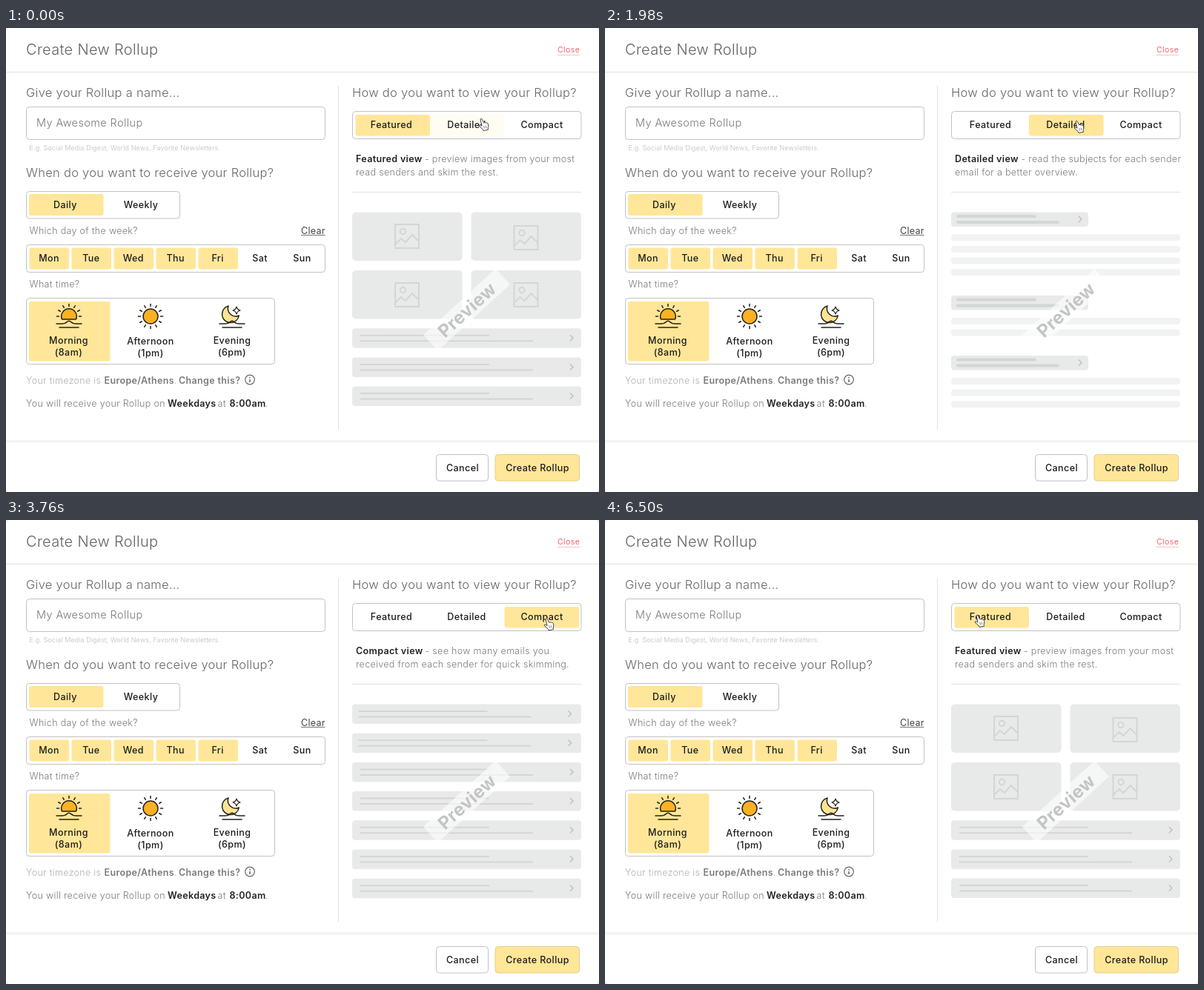
An HTML page that plays this animation: 800x626 px, repeating every 6.52 s.

```html
<!DOCTYPE html>
<html lang="en">
<head>
<meta charset="utf-8">
<title>Create New Rollup</title>
<style>
  html, body { margin: 0; width: 100%; height: 100%; overflow: hidden; background: #f1eded; }
  svg { display: block; width: 800px; height: 626px; }
  text { font: 300 12.5px Inter, "Open Sans", sans-serif; letter-spacing: .32px; fill: #7a7a7a; }
  .title { font-size: 20px; fill: #626262; }
  .head { font-size: 16.5px; letter-spacing: .27px; fill: #666; }
  .input { font-size: 14.5px; letter-spacing: .4px; }
  .hint { font-size: 9px; letter-spacing: .13px; fill: #bbb; }
  .label { font-weight: 500; letter-spacing: .42px; fill: #1c1c1c; text-anchor: middle; }
  .strong { font-weight: 600; fill: #222; letter-spacing: .35px; }
  .zone { fill: #b0b0b0; }
  .zone .strong { fill: #7a7a7a; }
  .clear { font-weight: 400; fill: #444; }
  .close { font-size: 10.5px; font-weight: 400; letter-spacing: .4px; fill: #f0646c; }
  .stamp { font-size: 24px; font-weight: 700; fill: #c3c5c5; text-anchor: middle; }
  .box { fill: #fff; stroke: #c2c2c2; }
  .pill { fill: #ffe699; }
  .hover { fill: #fffdf2; }
  .card { fill: #e8eaea; }
  .copy { fill: #f1f3f3; }
  .detail { fill: none; stroke: #d3d6d6; stroke-width: 2; }
  .thick { stroke-width: 4; stroke-linecap: round; }
  .chevron { fill: none; stroke: #bcbfbf; stroke-width: 1.4; }
  .ink { fill: none; stroke: #25221c; stroke-width: 1.5; stroke-linecap: round; stroke-linejoin: round; }
  .sun { fill: #fbb122; }
  .moon { fill: #ffe491; }
  .rule { stroke: #e2e2e2; }
</style>
</head>
<body>
<svg id="stage" viewBox="0 0 800 626"></svg>
<script>
const range = (n, f) => Array.from({ length: n }, (_, i) => f(i)).join('');
const rect = (x, y, w, h, cls, r = 4, extra = '') =>
  `<rect x="${x}" y="${y}" width="${w}" height="${h}" rx="${r}" class="${cls}" ${extra}/>`;
const text = (x, y, s, cls = '') => `<text x="${x}" y="${y}" class="${cls}">${s}</text>`;
const span = (x, s, cls = '') => `<tspan x="${x}" class="${cls}">${s}</tspan>`;
const path = (d, cls, extra = '') => `<path d="${d}" class="${cls}" ${extra}/>`;
const chevron = (x, y) => path(`M${x - 2} ${y - 4}l4 4l-4 4`, 'chevron');

// Rays at every 30 degrees, from step a to step b
const rays = (x, y, a, b) => range(b - a + 1, i => {
  const t = (a + i) * Math.PI / 6, c = Math.cos(t), s = Math.sin(t);
  return path(`M${x + 13.5 * c} ${y + 13.5 * s}L${x + 16.5 * c} ${y + 16.5 * s}`, 'ink');
});
const waves = (x, y) =>
  path(`M${x - 17} ${y}h7q5 0 8-3q2-1.5 4 0q3 3 8 3h7M${x - 13} ${y + 5}h26`, 'ink');

const morning = path('M75.5 393a10.3 10.3 0 1 1 19 0z', 'ink sun') + rays(85, 389, 6, 12) + waves(85, 399);
const afternoon = '<circle cx="195" cy="389" r="10" class="ink sun"/>' + rays(195, 389, 0, 11);
const evening = path('M300 375A11.5 11.5 0 1 0 314.3 388A10.5 10.5 0 0 1 300 375z', 'ink moon')
  + path('M311 376q1 4 5 5q-4 1-5 5q-1-4-5-5q4-1 5-5z', 'ink', 'style="stroke-width:1.2"')
  + waves(305, 399);

const row = (y, dx = 0) => rect(467, y, 309, 26.5, 'card')
  + path(`M${478 + dx} ${y + 9.5}h174M${478 + dx} ${y + 17}h233`, 'detail')
  + chevron(763 + dx, y + 13);
const picture = (x, y, ix, iy) => rect(x, y, 148.5, 65.5, 'card', 5)
  + path(`M${ix} ${iy}h32v32h-32zM${ix} ${iy + 27}l8-8l6 5l9-10l9 9`, 'detail')
  + `<circle cx="${ix + 10.5}" cy="${iy + 9.5}" r="3.7" class="detail"/>`;
const subject = y => rect(467, y, 185, 19.5, 'card')
  + path(`M476 ${y + 5.5}h104M476 ${y + 13.5}h135`, 'detail thick') + chevron(641, y + 9.5);
const copy = (y, n) => range(n, i => rect(467, y + 15.6 * i, 309, 9, 'copy'));

const about = (name, x, first, second) =>
  `<text y="180.5">${span(472, name + ' view', 'strong')}${span(x, '- ' + first)}</text>` + text(472, 198.5, second);

const views = [
  about('Featured', 565, 'preview images from your most', 'read senders and skim the rest.')
    + picture(467, 248.5, 525, 265) + picture(627.5, 248.5, 685.5, 267)
    + picture(467, 327, 525, 344) + picture(627.5, 327, 685.5, 344)
    + range(3, i => row(405.2 + 39.2 * i)),
  about('Detailed', 561.5, 'read the subjects for each sender', 'email for a better overview.')
    + subject(248.5) + copy(278.3, 4) + subject(361) + copy(391, 2) + subject(442) + copy(472, 3),
  about('Compact', 565.5, 'see how many emails you', 'received from each sender for quick skimming.')
    + range(7, i => row(248.5 + 39.2 * i, i < 2 ? -2.5 : 0))
];

const tabs = ['Featured', 'Detailed', 'Compact'];
const days = ['Mon', 'Tue', 'Wed', 'Thu', 'Fri', 'Sat', 'Sun'];
const times = [['Morning', '(8am)', 84.5, 425.5], ['Afternoon', '(1pm)', 195, 427], ['Evening', '(6pm)', 305, 425.5]];

document.getElementById('stage').innerHTML =
  rect(0, 0, 800, 626, '', 6, 'fill="#fff"')
  + text(27, 36, 'Create New Rollup', 'title') + text(744, 32.5, 'Close', 'close')
  + path('M744 36.5h30', '', 'stroke="#f9c3c6"')
  + path('M0 59.5H800M467 221.5H776M448.5 78V542', 'rule')
  + rect(0, 556, 800, 3.5, '', 0, 'fill="#f4f4f4"')

  + text(27, 93, 'Give your Rollup a name...', 'head')
  + rect(27.5, 106.5, 403, 44, 'box') + text(41, 133, 'My Awesome Rollup', 'input')
  + text(31.5, 165, 'E.g. Social Media Digest, World News, Favorite Newsletters.', 'hint')
  + text(27, 201, 'When do you want to receive your Rollup?', 'head')
  + rect(27.5, 220.5, 207, 36.5, 'box') + rect(31, 224, 100.5, 29, 'pill', 3)
  + text(80, 242.5, 'Daily', 'label') + text(182, 242.5, 'Weekly', 'label')
  + text(31.5, 278, 'Which day of the week?')
  + text(398, 277.5, 'Clear', 'clear') + path('M398 279.5h32.5', '', 'stroke="#777"')
  + rect(27.5, 292.5, 403, 37, 'box')
  + days.map((d, i) => (i < 5 ? rect(31.5 + 57 * i, 296.5, 53.5, 29, 'pill', 3) : '')
    + text(58 + 56.9 * i, 315.3, d, 'label')).join('')
  + text(31.5, 350, 'What time?')
  + rect(27.5, 364.5, 335, 89, 'box') + rect(31, 369, 109.5, 80.5, 'pill', 3)
  + morning + afternoon + evening
  + times.map(([name, hour, x, y]) => text(x, y, name, 'label') + text(x, y + 16, hour, 'label')).join('')
  + `<text y="479.5" class="zone">${span(27, 'Your timezone is')}${span(132.5, 'Europe/Athens', 'strong')}${span(226.5, '.')}${span(233, 'Change this?', 'strong')}</text>`
  + '<circle cx="329" cy="474.5" r="6.3" fill="none" stroke="#666" stroke-width="1.2"/>'
  + path('M329 471v1.4M329 474v4', '', 'stroke="#555" stroke-width="1.4"')
  + `<text y="511">${span(27, 'You will receive your Rollup on')}${span(218, 'Weekdays', 'strong')}${span(285.5, 'at')}${span(301.5, '8:00am', 'strong')}${span(350, '.')}</text>`

  + text(467, 93, 'How do you want to view your Rollup?', 'head')
  + rect(467.5, 112.5, 308.5, 37, 'box')
  + rect(572, 117, 100.5, 28.5, 'hover', 3, 'id="hover"') + rect(471.5, 117, 100.5, 28.5, 'pill', 3, 'id="pill"')
  + tabs.map((s, i) => text(520 + 101.5 * i, 135.3, s, 'label')).join('')
  + views.map(v => `<g class="view">${v}</g>`).join('')
  + `<g transform="translate(621.5 380) rotate(-42.5)">${rect(-66, -14.5, 132, 29, '', 1, 'fill="#fff" opacity=".6"')}${text(0, 9, 'Preview', 'stamp')}</g>`

  + rect(580.5, 575.5, 70, 35.5, 'box') + text(616, 597.8, 'Cancel', 'label')
  + rect(660, 575.5, 113.5, 35.5, 'pill', 4, 'stroke="#e3cf8a"') + text(717, 597.8, 'Create Rollup', 'label')
  + `<g id="hand">${path('M-4-7q1.2-1.6 2.4 0l2.1 5q.8-1.2 1.8 0q1.1-1 2 .2q1.2-.8 1.9.8q1.3 3 0 5.5l.2 2.8l-6.4 1.2l-1-2.2l-5-4.3q0-2 2.2-1l1.8 1.2z', '', 'fill="#fff" stroke="#444" stroke-linejoin="round"')}${path('M.6 2l1 3.5M3 1.6l.9 3.5', '', 'stroke="#666" stroke-width=".8"')}</g>`;

const LOOP = 6520, SLIDE = 220;
const clicks = [[0, 0], [1150, 1], [2660, 2], [4285, 1], [5950, 0]];
const moves = [[0, 644, 130], [150, 644, 130], [750, 611, 135], [1400, 611, 135], [1900, 639, 133], [2050, 639, 133],
  [2600, 751, 142], [3600, 751, 142], [4200, 644, 133], [4800, 644, 133], [5400, 502, 130], [5650, 502, 130], [5900, 505, 136], [LOOP, 505, 136]];
const clamp = v => Math.max(0, Math.min(1, v));
const ease = v => v * v * (3 - 2 * v);

const pill = document.getElementById('pill');
const hover = document.getElementById('hover');
const hand = document.getElementById('hand');
const groups = document.querySelectorAll('.view');

function draw(t) {
  const m = moves.findLastIndex(k => k[0] <= t);
  const [t0, x0, y0] = moves[m], [t1, x1, y1] = moves[m + 1];
  const p = ease((t - t0) / (t1 - t0));
  const x = x0 + (x1 - x0) * p, y = y0 + (y1 - y0) * p;
  hand.setAttribute('transform', `translate(${x} ${y})`);
  hover.setAttribute('x', 471.5 + 100.5 * (x < 572 ? 0 : x < 672 ? 1 : 2));

  const c = clicks.findLastIndex(k => k[0] <= t);
  const [start, view] = clicks[c], from = clicks[Math.max(0, c - 1)][1];
  pill.setAttribute('x', 471.5 + 100.5 * (from + (view - from) * ease(clamp((t - start) / SLIDE))));
  groups.forEach((g, i) => g.style.display = i === view ? '' : 'none');
}

const begin = performance.now();
function tick() {
  draw((performance.now() - begin) % LOOP);
  requestAnimationFrame(tick);
}
tick();
</script>
</body>
</html>
```
